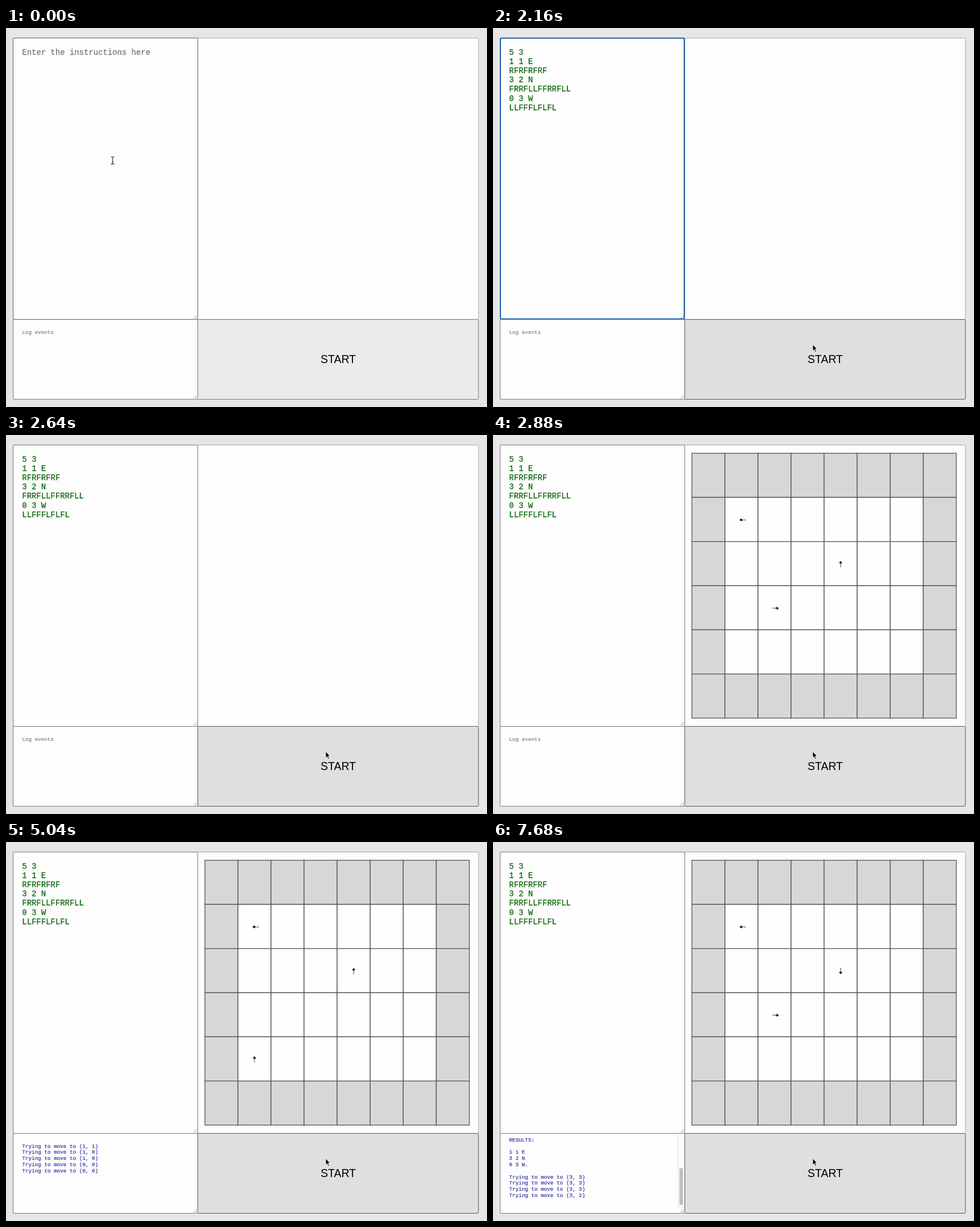
Recreate the animation shown at these times as an HTML page. Size 844x664 px, loop 8000 ms.

```html
<!DOCTYPE html>
<html lang="en">
<head>
<meta charset="utf-8">
<title>Robot grid</title>
<style>
html, body { margin: 0; width: 100%; height: 100%; overflow: hidden; background: #e6e6e6; }
svg { display: block; width: 844px; height: 664px; }
.mono { font-family: "Liberation Mono", "Courier New", monospace; white-space: pre; }
.big { font-size: 13.9px; stroke-width: .25px; }
.small { font-size: 9.27px; stroke-width: .1px; }
.hint { fill: #757575; stroke: #757575; }
.code { fill: #0b640b; stroke: #0b640b; }
.log { fill: #1c1c96; stroke: #1c1c96; }
.start { font: 19.4px "Liberation Sans", Arial, sans-serif; text-anchor: middle; }
</style>
</head>
<body>
<svg id="stage" viewBox="0 0 844 664" xmlns="http://www.w3.org/2000/svg">
  <defs><clipPath id="logClip"><rect x="13" y="511" width="323" height="139"/></clipPath></defs>
  <rect width="844" height="664" fill="#e6e6e6"/>
  <rect x="336.5" y="17.5" width="492.5" height="493" rx="1" fill="#fdfdfd" stroke="#a8a8a8"/>
  <rect id="log" x="12.5" y="510.5" width="324" height="140" rx="1.5" fill="#fdfdfd" stroke="#777"/>
  <rect id="button" x="336.5" y="510.5" width="492.5" height="140" rx="2"/>
  <text class="start" x="583" y="586.6">START</text>
  <rect id="input" x="12.5" y="17.5" width="324" height="493" rx="1.5" fill="#fdfdfd"/>
  <rect id="focus" x="13" y="17.7" width="322.6" height="492" rx="1.5" fill="none" stroke="#1d5fb0" stroke-width="2"/>
  <path d="M329 509l6-6M333 509l2-2M329 649l6-6M333 649l2-2" stroke="#8a8a8a" stroke-width=".9"/>
  <text id="inputHint" class="mono big hint" x="28.3" y="46.5">Enter the instructions here</text>
  <g id="codeText"></g>
  <rect id="caret" width="1" height="15" fill="#0b640b"/>
  <text id="logHint" class="mono small hint" x="28.3" y="535.6">Log events</text>
  <g clip-path="url(#logClip)"><g id="logText"></g></g>
  <g id="scrollbar">
    <rect x="324" y="511" width="12" height="128" fill="#fafafa"/>
    <path d="M324.5 511V639.5M324 639.5H336" fill="none" stroke="#e6e6e6"/>
    <rect id="thumb" x="327" width="6.5" rx="3.2" fill="#c0c0c0"/>
  </g>
  <g id="grid"></g>
  <path id="beam" d="M-3-6.5Q0-6.5 0-4.5Q0-6.5 3-6.5M0-5V5M-3 6.5Q0 6.5 0 4.5Q0 6.5 3 6.5M-1.5 2H1.5" fill="none" stroke="#222" stroke-width="1.1"/>
  <path id="pointer" d="M0 0V11.2L2.5 8.9L4.4 13.2L6.2 12.4L4.3 8.2H7.8Z" fill="#000" stroke="#fff" stroke-width=".8"/>
</svg>
<script>
const LOOP = 8000, TICK = 80;
const FOCUS = 80, PASTE = 960, PRESS = 2240, RELEASE = 2400, GRID = 2880, RUN = 3200, STEP = 400, BLINK = 560;
const LINE = 16.2, LOG_LINE = 10.8, COL = 58, ROW = 464 / 6;
const DIRS = "NESW", DX = [0, 1, 0, -1], DY = [1, 0, -1, 0];
const source = ["5 3", "1 1 E", "RFRFRFRF", "3 2 N", "FRRFLLFFRRFLL", "0 3 W", "LLFFFLFLFL"];
// pointer progress along its straight path: [time, share]
const path = [[1440, 0], [1520, .064], [1600, .51], [1680, .78], [1760, .96], [1840, 1]];

const $ = id => document.getElementById(id);
const show = (id, on) => $(id).setAttribute("display", on ? "inline" : "none");
const set = (id, attrs) => { for (const k in attrs) $(id).setAttribute(k, attrs[k]); };
const lines = (list, cls, y, gap) => list.map((s, i) =>
  `<text class="mono ${cls}" x="28.3" y="${(y + i * gap).toFixed(2)}">${s}</text>`).join("");

function buildGrid() {
  let s = "";
  for (let r = 0; r < 6; r++) for (let c = 0; c < 8; c++) {
    const edge = r % 5 === 0 || c % 7 === 0;
    s += `<rect x="${349 + c * COL}" y="${32 + r * ROW}" width="${COL}" height="${ROW}" fill="${edge ? "#d7d7d7" : "#fefefe"}" stroke="#555" stroke-width="1.3"/>`;
  }
  for (let i = 0; i < 3; i++)
    s += `<g id="bot${i}"><path d="M0-5.5L3-1.6H-3Z"/><path d="M0-2V5.3" stroke="#000" stroke-width="1.2" stroke-dasharray="3 1 1.3 .8"/></g>`;
  $("grid").innerHTML = s;
}

function simulate(steps) {
  const bots = [1, 3, 5].map(i => {
    const [x, y, d] = source[i].split(" ");
    return { x: +x, y: +y, d: DIRS.indexOf(d), moves: source[i + 1] };
  });
  const log = [];
  for (const b of bots) {
    for (const m of b.moves) {
      if (steps-- <= 0) return { bots, log };
      if (m === "F") { b.x += DX[b.d]; b.y += DY[b.d]; }
      else b.d = (b.d + (m === "R" ? 1 : 3)) % 4;
      log.push(`Trying to move to (${b.x}, ${b.y})`);
    }
    const state = bots.map(o => `${o.x} ${o.y} ${DIRS[o.d]}`);
    log.push("Robot movements finished", "", "RESULTS:", "", state[0], state[1], state[2] + ".", "");
  }
  return { bots, log };
}

function progress(t) {
  for (let i = 1; i < path.length; i++) {
    const [a, p] = path[i - 1], [b, q] = path[i];
    if (t < b) return t < a ? p : p + (q - p) * (t - a) / (b - a);
  }
  return 1;
}

function drawCursor(t) {
  const p = progress(t), x = 187 + 374 * p, y = 232 + 322.5 * p;
  const inside = x < 336;
  show("beam", inside);
  show("pointer", !inside);
  set(inside ? "beam" : "pointer", { transform: `translate(${x} ${y})` });
  const pressed = t >= PRESS && t < RELEASE, hover = y > 510;
  set("button", {
    fill: pressed ? "#f1f1f1" : hover ? "#dfdfdf" : "#ebebeb",
    stroke: pressed ? "#8a8a8a" : hover ? "#555" : "#777"
  });
}

function drawInput(t) {
  const focused = t >= FOCUS && t < PRESS, pasted = t >= PASTE;
  set("input", { stroke: t < FOCUS ? "#5c5c5c" : "#777" });
  show("focus", focused);
  show("inputHint", !pasted);
  show("codeText", pasted);
  show("caret", focused && Math.floor((t - FOCUS) / BLINK) % 2 === 0);
  set("caret", pasted ? { x: 112, y: 35 + 6 * LINE } : { x: 29, y: 35 });
}

function drawLog(log) {
  const scroll = Math.max(0, log.length - 9);
  const overflow = log.length > 9;
  show("logHint", !log.length);
  $("logText").innerHTML = lines(log, "small log", 535.6 - scroll * LOG_LINE, LOG_LINE);
  show("scrollbar", overflow);
  if (overflow) {
    const h = 120.6 * 139 / ((log.length + 1) * LOG_LINE + 32);
    set("thumb", { y: 636 - h, height: h });
  }
}

function draw(t) {
  drawCursor(t);
  drawInput(t);
  const { bots, log } = simulate(t < RUN ? 0 : Math.floor((t - RUN) / STEP) + 1);
  drawLog(log);
  show("grid", t >= GRID);
  bots.forEach((b, i) => {
    const x = 349 + (b.x + 1.5) * COL + (b.d % 2 ? 2 : 0);
    const y = 32 + (4.5 - b.y) * ROW + .8;
    set("bot" + i, { transform: `translate(${x} ${y}) rotate(${b.d * 90})` });
  });
}

buildGrid();
$("codeText").innerHTML = lines(source, "big code", 46.5, LINE);
let last = -1;
function frame() {
  const t = Math.floor(performance.now() % LOOP / TICK) * TICK;
  if (t !== last) draw(last = t);
  requestAnimationFrame(frame);
}
frame();
</script>
</body>
</html>
```
